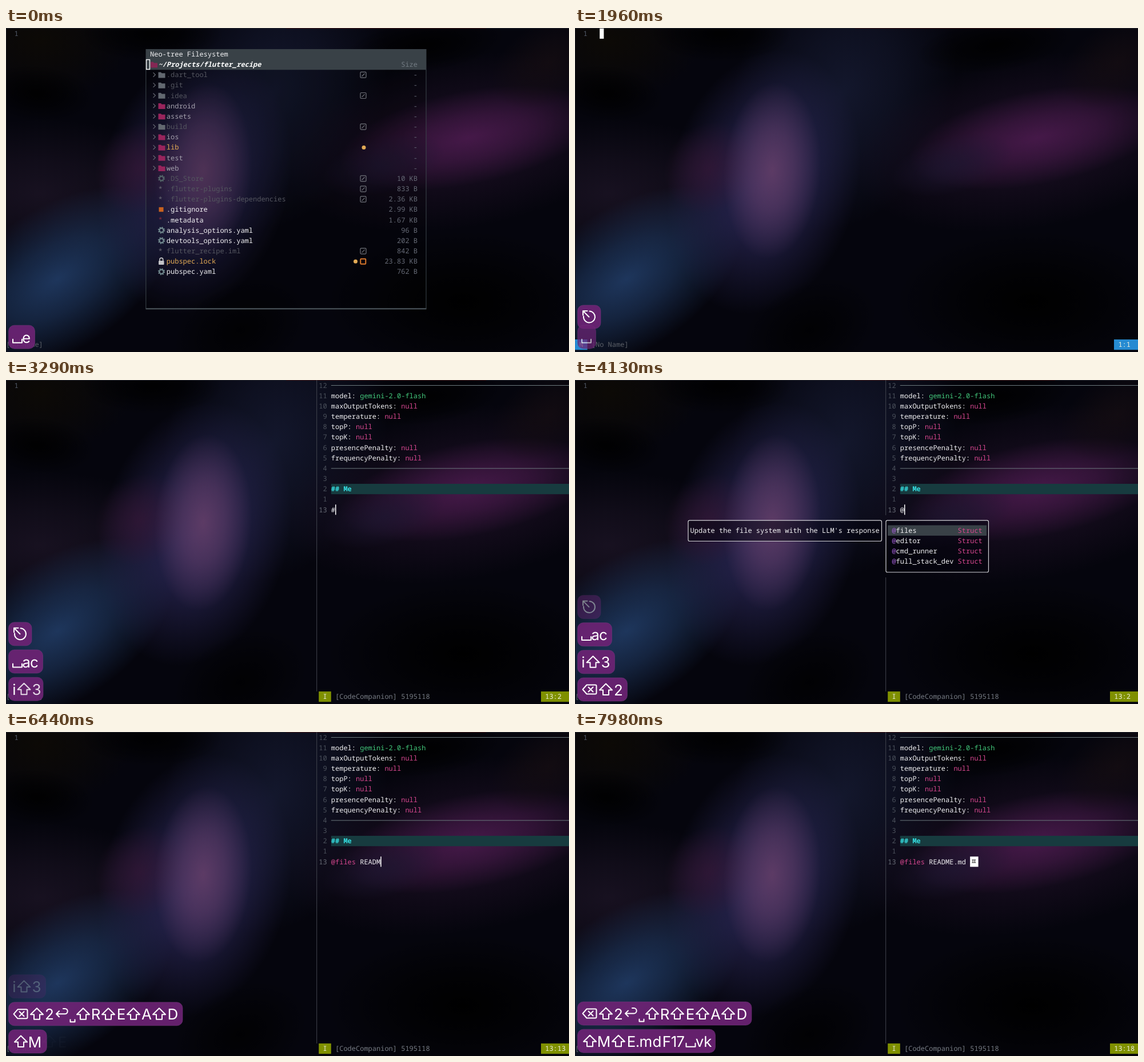
An HTML page that plays this animation: 985 by 568 pixels, repeating every 8000 ms.

```html
<!DOCTYPE html>
<html lang="en">
<head>
<meta charset="utf-8">
<title>Editor session</title>
<style>
html, body { margin: 0; width: 100%; height: 100%; overflow: hidden; background: #04040a; }
svg { display: block; width: 985px; height: 568px; }
text { font: 12px "Noto Sans Mono", monospace; white-space: pre; text-rendering: geometricPrecision; }
.bold { font-weight: bold; }
.slant { font-style: italic; font-weight: bold; }
.key { font: 26px Inter, sans-serif; text-anchor: middle; fill: #fff; }
.jamo { font: 12px "Noto Sans CJK KR", "Noto Sans CJK", sans-serif; }
.sym { fill: none; stroke: #fff; stroke-width: 2; stroke-linejoin: round; stroke-linecap: round; }
</style>
</head>
<body>
<svg id="stage" viewBox="0 0 985 568"></svg>
<script>
(() => {
const LOOP = 8000, CW = 7.2, LH = 18.17;
const WHITE = '#f0f0f2', DIM = '#54565f', PINK = '#d6478f', AMBER = '#e2aa55';
const stage = document.getElementById('stage');

const lineTop = line => 0.3 + (line - 1) * LH;
const clamp = v => Math.max(0, Math.min(1, v));
const ease = v => 1 - (1 - clamp(v)) ** 3;
const rect = (x, y, w, h, fill, more = '') =>
  `<rect x="${x}" y="${y}" width="${w}" height="${h}" fill="${fill}" ${more}/>`;
const path = (d, more) => `<path d="${d}" ${more}/>`;
const text = (col, line, s, fill, more = '') =>
  `<text x="${col * CW}" y="${lineTop(line) + 13.2}" fill="${fill}" ${more}>${s}</text>`;
const span = (s, fill) => `<tspan fill="${fill}">${s}</tspan>`;
const group = (id, body) => `<g id="${id}">${body}</g>`;

// Backdrop: soft glows on near black
const glows = [
  // cx, cy, rx, ry, angle, colour, strength
  [60, 290, 260, 130, 0, '#1c1425', 0.8],
  [470, 110, 190, 250, 20, '#14182e', 0.95],
  [90, 440, 230, 125, -33, '#1e365c', 1],
  [330, 270, 165, 235, 14, '#2b2858', 1],
  [235, 245, 85, 75, -50, '#3a1636', 0.6],
  [345, 250, 85, 155, 4, '#5f3c66', 0.95],
  [800, 200, 320, 150, -10, '#1c0f24', 1],
  [810, 192, 230, 82, -11, '#47194a', 0.95],
  [660, 240, 110, 50, -15, '#1d1731', 0.7],
  [950, 60, 110, 70, -30, '#150d12', 0.8],
  [60, 20, 160, 110, 0, '#0d0a05', 0.9],
  [55, 115, 100, 50, 5, '#000', 0.9],
  [255, 10, 125, 50, 0, '#000', 0.9],
  [735, 30, 140, 48, -8, '#000', 0.9],
  [800, 480, 240, 125, 0, '#000', 1],
  [410, 530, 125, 85, -25, '#000', 0.75]
];
function backdrop() {
  const defs = glows.map(([, , , , , c, o], i) =>
    `<radialGradient id="g${i}"><stop stop-color="${c}" stop-opacity="${o}"/>` +
    `<stop offset=".45" stop-color="${c}" stop-opacity="${o * 0.62}"/>` +
    `<stop offset="1" stop-color="${c}" stop-opacity="0"/></radialGradient>`).join('');
  return `<defs>${defs}</defs>` + rect(0, 0, 985, 568, '#05050d') +
    glows.map(([x, y, rx, ry, a], i) =>
      `<ellipse rx="${rx}" ry="${ry}" fill="url(#g${i})" transform="translate(${x} ${y}) rotate(${a})"/>`).join('') +
    rect(0, 0, 985, 1, '#22242c') + rect(490, 0, 350, 1, '#3c1a1c') + rect(0, 0, 1, 568, '#14161c');
}

// File tree
const icons = {
  folder: (x, y, c) => path(`M${x} ${y - 4.5}h4.5l1.5 1.7h6v8.3h-12z`, `fill="${c}"`),
  gear: (x, y, c) => `<circle cx="${x + 5.5}" cy="${y}" r="3.6" fill="none" stroke="${c}" stroke-width="2.2"/>` +
    `<circle cx="${x + 5.5}" cy="${y}" r="5.2" fill="none" stroke="${c}" stroke-width="1.8" stroke-dasharray="2.04"/>`,
  star: (x, y, c) => `<text x="${x}" y="${y + 4}" fill="${c}">*</text>`,
  square: (x, y, c) => rect(x + 1, y - 4, 8, 8, c),
  lock: (x, y, c) => rect(x + 0.5, y - 1, 9.5, 7, c, 'rx="1"') +
    path(`M${x + 2.4} ${y - 1}v-2a2.9 2.9 0 0 1 5.8 0v2`, `fill="none" stroke="${c}" stroke-width="1.6"`)
};
const tree = [
  // name, size, icon, flags: i ignored, h hidden, m modified, s marked
  ['.dart_tool', '-', 'folder', 'i'], ['.git', '-', 'folder', 'h'], ['.idea', '-', 'folder', 'i'],
  ['android', '-', 'folder', ''], ['assets', '-', 'folder', ''], ['build', '-', 'folder', 'i'],
  ['ios', '-', 'folder', ''], ['lib', '-', 'folder', 'm'], ['test', '-', 'folder', ''], ['web', '-', 'folder', ''],
  ['.DS_Store', '10 KB', 'gear', 'i'], ['.flutter-plugins', '833 B', 'star', 'i'],
  ['.flutter-plugins-dependencies', '2.36 KB', 'star', 'i'], ['.gitignore', '2.99 KB', 'square', ''],
  ['.metadata', '1.67 KB', 'star', ''], ['analysis_options.yaml', '96 B', 'gear', ''],
  ['devtools_options.yaml', '202 B', 'gear', ''], ['flutter_recipe.iml', '842 B', 'star', 'i'],
  ['pubspec.lock', '23.83 KB', 'lock', 'ms'], ['pubspec.yaml', '762 B', 'gear', '']
];
function treeRow([name, size, icon, flags], i) {
  const line = 5 + i, y = lineTop(line) + 9, dir = icon === 'folder';
  const off = /[ih]/.test(flags), mod = flags.includes('m'), marked = flags.includes('s');
  const tint = { folder: off ? '#626870' : '#98245c', gear: off ? '#536468' : '#71898e',
    star: off ? '#6a6a74' : '#8a2a3c', square: '#c9621f', lock: '#c4c4c8' }[icon];
  const ink = mod ? AMBER : off ? DIM : dir ? '#a3a0ac' : WHITE;
  let s = icons[icon](266.5, y, tint) + text(39, line, name, ink) +
    text(100, line, size, '#666a76', 'text-anchor="end"');
  if (dir) s += path(`M257.5 ${y - 3.8}l3.8 3.8l-3.8 3.8`, 'fill="none" stroke="#666872" stroke-width="1.2"');
  if (flags === 'i') s += rect(620, y - 4.8, 10, 10, 'none', 'rx="1.5" stroke="#72757c" stroke-width="1.2"') +
    path(`M622.5 ${y + 2.8}l5 -5`, 'stroke="#72757c" stroke-width="1.2"');
  if (mod) s += `<circle cx="${marked ? 611.5 : 626}" cy="${y + 0.3}" r="3.5" fill="${AMBER}"/>`;
  if (marked) s += rect(620.3, y - 4.4, 9, 9, 'none', 'rx="1" stroke="#d9772b" stroke-width="2"');
  return s;
}
const panel = () =>
  rect(245, 37.5, 490, 455, 'rgba(0,0,4,.16)') + rect(244.5, 37, 491, 36.3, '#394147') +
  path('M244.8 73V492M735 73V492', 'stroke="#3d464c"') + rect(244.5, 491, 491, 2.4, '#424b51') +
  text(35, 3, 'Neo-tree Filesystem', WHITE) +
  icons.folder(253, 64, '#852754') +
  text(37, 4, '~/Projects/flutter_recipe', '#fff', 'class="slant"') +
  text(100, 4, 'Size', '#737b83', 'text-anchor="end"') + tree.map(treeRow).join('') +
  rect(245.5, 55.5, 6, 17, '#fff', 'id="treeCursor" stroke="#fff" stroke-width="1.4"');

// Chat pane
const params = ['maxOutputTokens', 'temperature', 'topP', 'topK', 'presencePenalty', 'frequencyPenalty'];
function chat() {
  let s = rect(568.8, lineTop(11), 417, 18.2, '#173b3f');
  for (let i = 1; i <= 13; i++)
    s += text(78, i, i === 13 ? 13 : 13 - i, i === 13 ? '#686c76' : '#4c525c', 'text-anchor="end"');
  s += rect(568.8, 9, 417, 1, '#6d7a7e') + rect(568.8, 154.5, 417, 1, '#6d7a7e');
  s += text(79, 2, 'model: ' + span('gemini-2.0-flash', '#43c87c'), WHITE);
  params.forEach((p, i) => { s += text(79, 3 + i, p + ': ' + span('null', PINK), WHITE); });
  return s + text(79, 11, '## Me', '#35dfe2', 'class="bold"') +
    text(80, 31, '[CodeCompanion] 5195118', '#777c84');
}
const box = (x, w, h) => rect(x, 246.2, w, h, 'rgba(3,3,12,.5)', 'rx="2.5" stroke="#d2d2d6" stroke-width="1.2"');
const popup = () => box(198, 338.5, 36.3) + text(28, 15, 'Update the file system with the LLM\'s response', WHITE) +
  box(544, 179.5, 90.8) + rect(547.2, lineTop(15), 173, 18.2, '#394147') +
  ['files', 'editor', 'cmd_runner', 'full_stack_dev'].map((n, i) =>
    text(77, 15 + i, span('@', '#a35fd6') + n, WHITE) + text(93, 15 + i, 'Struct', PINK)).join('');

// Pressed keys: start time, fade start, fade length, keys as [time, glyph, centre x, right edge]
const rows = [
  { from: -3000, out: 40, len: 420, keys: [[-3000, '_', 20, 51], [-2900, 'e', 35.5, 51]] },
  { from: 770, out: 3900, len: 420, keys: [[770, 'esc', 24.5, 45.5]] },
  { from: 1890, out: 5160, len: 280, keys: [[1890, '_', 20, 37], [2030, 'a', 35.5, 51], [2170, 'c', 49.5, 65]] },
  { from: 2730, out: 6230, len: 280, keys: [[2730, 'i', 14.5, 24], [3220, 'up', 31.5, 48], [3220, '3', 53.5, 70]] },
  { from: 3780, out: 9e9, len: 1, keys: [[3780, 'del', 25.5, 46], [3990, 'up', 54, 74], [3990, '2', 76, 92],
    [4270, 'ret', 98, 118], [4690, 'sp', 116.5, 130], [5180, 'up', 135, 150], [5180, 'R', 157, 174],
    [5320, 'up', 179, 195], [5320, 'E', 201.5, 217], [5530, 'up', 223, 240], [5530, 'A', 246, 265],
    [5740, 'up', 268, 285], [5740, 'D', 292, 309.5]] },
  { from: 6230, out: 9e9, len: 1, keys: [[6230, 'up', 26, 45], [6230, 'M', 50.5, 70.5], [6440, 'up', 76, 94],
    [6440, 'E', 98.5, 114], [6680, '.', 109.5, 119], [6960, 'm', 124, 143], [7080, 'd', 143.5, 159],
    [7490, 'F', 160.5, 176], [7490, '1', 173, 186], [7490, '7', 184.5, 199], [7600, '_', 202.5, 219],
    [7720, 'v', 218, 233], [7820, 'k', 232.5, 246]] }
];
const symbols = {
  up: 'M-11 1L0-10L11 1H5V9.5H-5V1Z',
  del: 'M-12 0L-5-8H10Q12-8 12-6V6Q12 8 10 8H-5ZM-2-4L6 4M6-4L-2 4',
  ret: 'M-10 0H5A4.7 4.7 0 0 0 5-9.4H2M-5-5L-10 0L-5 5',
  _: 'M-8 4V10H8V4',
  sp: 'M-4 10V14H4V10',
  esc: 'M1-10A10 10 0 1 1-9.5-1M0 0L-9-9M-10.5-3V-10.5H-3'
};
const keyMark = ([, k, x]) => symbols[k]
  ? `<path class="sym" d="${symbols[k]}" transform="translate(${x} 21)"/>`
  : `<text class="key" x="${x}" y="31">${k}</text>`;
const badge = (r, i) => group('row' + i,
  rect(4.5, 0.5, 40, 41, '#6c2374', 'rx="10" fill-opacity=".93" stroke="#7b3a80" stroke-opacity=".5"') +
  r.keys.map(keyMark).join(''));

stage.innerHTML = backdrop() + text(2, 1, '1', '#525a68') +
  rect(43.2, 0.8, 7.2, 18, '#fff', 'id="homeCursor"') +
  text(0, 31, '[No Name]', '#5b5f67', 'id="noName"') +
  path('', 'id="divider" stroke="#43454f"') + group('chat', chat()) +
  group('status', rect(0, 546, 21.6, 18.2, 'none', 'id="modeBox"') + text(0, 31, '', '#e8ead8', 'id="mode"') +
    rect(0, 546, 50, 18.2, 'none', 'id="posBox"') + text(131, 31, '', '#f0f2e0', 'id="pos"')) +
  group('prompt', text(79, 13, '', WHITE, 'id="typed"') + rect(0, lineTop(13), 1.5, 18, '#fff', 'id="caret"') +
    '<text id="jamo" class="jamo" y="231" fill="#111">ㅍ</text>') +
  group('popup', popup()) + group('panel', panel()) + rows.map(badge).join('');

const el = {};
stage.querySelectorAll('[id]').forEach(n => { el[n.id] = n; });
const set = (n, o) => { for (const k in o) n.setAttribute(k, o[k]); };
const show = (n, on) => { n.style.display = on ? '' : 'none'; };

// Prompt contents by time
const edits = [[0, ''], [3220, '#'], [3780, ''], [3990, '@'], [4340, '@files'], [4690, '@files '],
  ...[5180, 5320, 5530, 5810, 6230, 6510, 6720, 7000, 7140, 7630]
    .map((t, i) => [t, '@files ' + 'README.md '.slice(0, i + 1)])];

function drawEditor(t) {
  const floating = t < 1120, split = t >= 2240, chatOn = t >= 2380, insert = t >= 2730;
  const home = !floating && !split, menu = t >= 4060 && t < 4340, composing = t >= 7770;
  show(el.panel, floating);
  el.treeCursor.setAttribute('fill', t < 70 ? 'none' : '#fff');
  show(el.homeCursor, !floating && !chatOn);
  show(el.divider, split);
  el.divider.setAttribute('d', menu ? 'M543.7 0V237M543.7 346V546' : 'M543.7 0V546');
  show(el.chat, chatOn);
  show(el.prompt, chatOn);
  show(el.popup, menu);

  const line = edits.filter(e => e[0] <= t).pop()[1];
  el.typed.innerHTML = line.startsWith('@files') ? span('@files', PINK) + line.slice(6) : line;
  const x = (79 + line.length) * CW;
  set(el.caret, { x, width: composing ? 14.4 : insert ? 1.5 : CW });
  el.jamo.setAttribute('x', x + 1);
  show(el.jamo, composing);

  show(el.status, home || chatOn);
  const tone = insert ? '#7f9000' : '#268bd2', left = chatOn ? 76 : 0;
  set(el.modeBox, { x: left * CW, fill: tone });
  set(el.mode, { x: (left + 1) * CW });
  el.mode.textContent = insert ? 'I' : 'N';
  set(el.noName, { x: home ? 4 * CW : 0 });
  set(el.posBox, { x: chatOn ? 936 : 943, fill: tone });
  set(el.pos, { x: (chatOn ? 131 : 132) * CW });
  el.pos.textContent = chatOn ? '13:' + (line.length + 1) : '1:1';
}

function drawKeys(t) {
  const base = t >= 3780 && t < 7490 ? 521.5 : 520.7;
  rows.forEach((r, i) => {
    const alpha = ease((t - r.from) / 180) * (1 - clamp((t - r.out) / r.len));
    const g = el['row' + i];
    show(g, alpha > 0);
    if (alpha <= 0) return;
    const lift = rows.slice(i + 1).reduce((s, n) => s + ease((t - n.from) / 200), 0);
    set(g, { opacity: alpha, transform: `translate(0 ${base - (i ? lift : 0) * 48.2})` });
    let edge = r.keys[0][3];
    r.keys.forEach((k, j) => {
      const p = ease((t - k[0]) / 160);
      edge += (k[3] - edge) * p;
      g.children[j + 1].setAttribute('opacity', p);
    });
    g.children[0].setAttribute('width', edge - 5);
  });
}

const began = performance.now();
function tick(now) {
  const t = Math.max(0, now - began) % LOOP;
  drawEditor(t);
  drawKeys(t);
  requestAnimationFrame(tick);
}
tick(began);
})();
</script>
</body>
</html>
```
